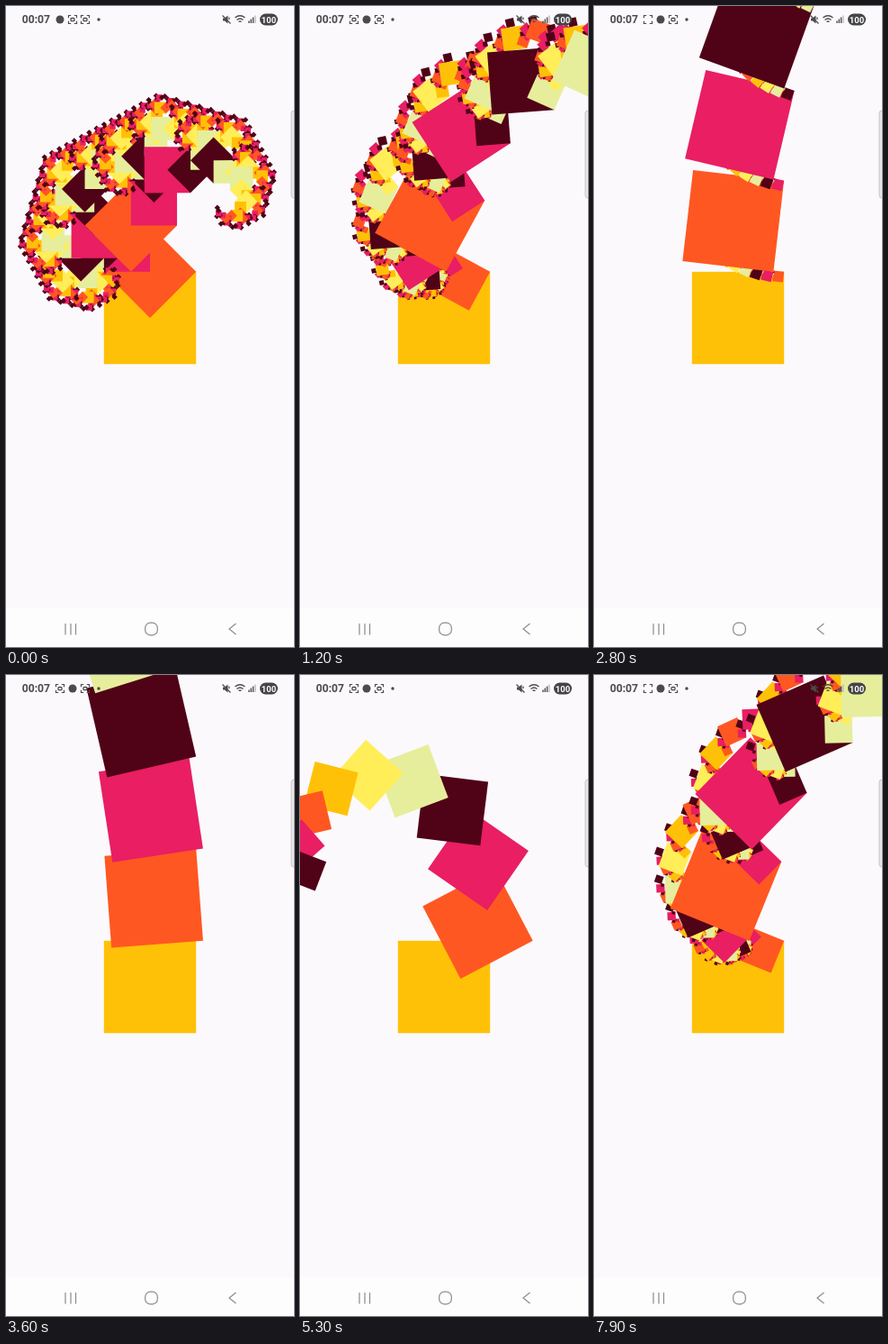
Animation, 320 px wide and 711 px high, one loop 8 s. Source, as an HTML page with a canvas:

```html
<!DOCTYPE html>
<html lang="en">
<head>
<meta charset="utf-8">
<title>Swaying Pythagoras tree</title>
<style>
  html, body { margin: 0; width: 100%; height: 100%; overflow: hidden; background: #fbf9fc; }
  canvas, svg { position: absolute; left: 0; top: 0; width: 320px; height: 711px; }
  text { font-family: Roboto, Inter, sans-serif; font-weight: 700; }
</style>
</head>
<body>
<canvas id="tree"></canvas>
<svg viewBox="0 0 320 711" fill="none" stroke="#4b4a4c">
  <defs>
    <path id="corners" d="M-4.500-1.800V-4.500H-1.800M1.800-4.500H4.500V-1.800M4.500 1.800V4.500H1.800M-1.800 4.500H-4.500V1.800" stroke-width="1.200"/>
    <rect id="core" x="-2" y="-1.500" width="4" height="3.200" rx="1" stroke-width="1.300"/>
  </defs>

  <g>
    <text x="17.700" y="19" font-size="12.200" fill="#4b4a4c" stroke="none">00:07</text>
    <circle id="badge" cy="15" r="4.500" fill="#4b4a4c" stroke="none"/>
    <g id="scan"><use href="#corners"/><use id="scanCore" href="#core"/></g>
    <g transform="translate(88 15)"><use href="#corners"/><use href="#core"/></g>
    <circle cx="103" cy="15" r="1.700" fill="#4b4a4c" stroke="none"/>

    <path d="M241 13.500H243L246.500 10.500V19.500L243 16.500H241Z" fill="#4b4a4c" stroke="none"/>
    <path d="M240.500 10.500L249.500 19.500M248 12.500V15" stroke-width="1.200"/>
    <path d="M254.500 13Q260 8.500 265.500 13M256.500 15.500Q260 12.500 263.500 15.500M258.500 17.500Q260 16.500 261.500 17.500" stroke-width="1.300"/>
    <path d="M270 19V16.500M272.300 19V14.500M274.600 19V12.500" stroke-width="1.400"/>
    <path d="M276.900 19V10.500" stroke-width="1.400" stroke="#bbb9bd"/>
    <rect x="282" y="8.500" width="20" height="13" rx="6.500" fill="#454446" stroke="none"/>
    <text x="292" y="18.500" font-size="9.500" fill="#fff" stroke="none" text-anchor="middle">100</text>
  </g>

  <rect x="317" y="116" width="8" height="97" rx="3" fill="#e9e7ea" stroke="#c4c2c5"/>

  <rect y="668" width="320" height="43" fill="#fdfdfd" stroke="none"/>
  <g stroke="#8b8a8c" stroke-width="1.200">
    <path d="M66 685V697.500M72 685V697.500M77.500 685V697.500"/>
    <rect x="154.700" y="684.200" width="13.600" height="13.600" rx="5.500"/>
    <path d="M255.500 685L248 691L255.500 697"/>
  </g>
</svg>
<script>
const LOOP = 8000, LEVELS = 10, BASE = 102.4;
const COLORS = ['#ffc107', '#ff5722', '#e91e63', '#500217', '#e6ee9c', '#ffee58'];
// [ms, lean in degrees]
const KEYS = [[0, 45], [5400, -29], [5700, -45], [6300, -12.2], [8000, 24.3]];

const $ = id => document.getElementById(id);
const canvas = $('tree'), ctx = canvas.getContext('2d');
const ratio = window.devicePixelRatio || 1;
canvas.width = 320 * ratio;
canvas.height = 711 * ratio;

function leanAt(t) {
  const i = KEYS.findIndex(key => key[0] > t);
  const [t0, a0] = KEYS[i - 1], [t1, a1] = KEYS[i];
  return (a0 + (a1 - a0) * (t - t0) / (t1 - t0)) * Math.PI / 180;
}

// Each square hangs from its bottom right corner at the local origin.
function branch(level, size, lean) {
  if (level === LEVELS || size <= 0) return;
  ctx.fillStyle = COLORS[level % COLORS.length];
  ctx.fillRect(-size, -size, size, size);
  const small = size * Math.sin(lean), large = size * Math.cos(lean);
  grow(0, lean - Math.PI / 2, small);
  grow(-small, lean, large);

  function grow(x, turn, side) {
    ctx.save();
    ctx.translate(x, -size);
    ctx.rotate(turn);
    branch(level + 1, side, lean);
    ctx.restore();
  }
}

function drawStatus(t) {
  const swapped = t >= 1000;
  $('badge').setAttribute('cx', swapped ? 74 : 60);
  $('scan').setAttribute('transform', `translate(${swapped ? 60 : 74} 15)`);
  const hollow = (t > 2000 && t < 3600) || t > 6000;
  $('scanCore').setAttribute('visibility', hollow ? 'hidden' : 'visible');
}

function frame() {
  const t = performance.now() % LOOP;
  ctx.setTransform(ratio, 0, 0, ratio, 0, 0);
  ctx.clearRect(0, 0, 320, 711);
  ctx.translate(160 + BASE / 2, 346 + BASE / 2);
  branch(0, BASE, leanAt(t));
  drawStatus(t);
  requestAnimationFrame(frame);
}
frame();
</script>
</body>
</html>
```
